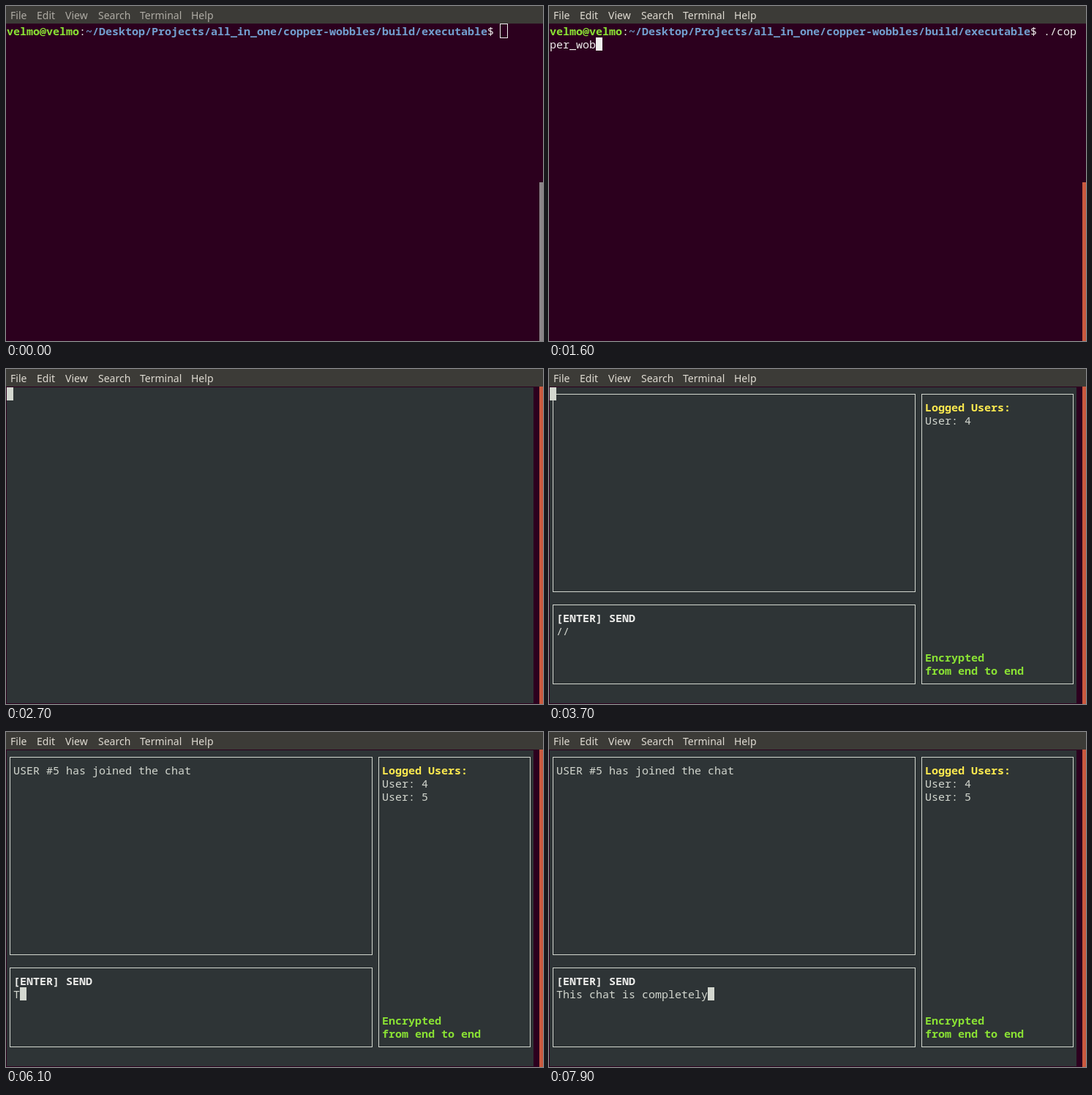
An HTML page with a canvas for the animation above (8000 ms loop, 734 by 458 pixels).

```html
<!DOCTYPE html>
<html lang="en">
<head>
<meta charset="utf-8">
<title>Terminal chat</title>
<style>
  html, body { margin: 0; width: 100%; height: 100%; overflow: hidden; background: #2c001e; }
  canvas { display: block; }
</style>
</head>
<body>
<canvas id="stage" width="734" height="458"></canvas>
<script>
const ctx = document.getElementById('stage').getContext('2d');
const LOOP = 8000, COLS = 80, CELL_W = 9, CELL_H = 18;
const PURPLE = '#2c001e', SLATE = '#2e3436', LIGHT = '#d3d7cf', WHITE = '#eeeeec';
const GREEN = '#8ae234', BLUE = '#729fcf', YELLOW = '#fce94f';

const MENU = [['File', 6], ['Edit', 42], ['View', 81], ['Search', 126], ['Terminal', 183], ['Help', 253]];
const USER = 'velmo@velmo';
const PATH = '~/Desktop/Projects/all_in_one/copper-wobbles/build/executable';
const COMMAND = './copper_wobbles 127.0.0.1 54000';
const MESSAGE = 'This chat is completely';

const cellX = col => 1 + col * CELL_W;
const cellY = row => 25 + row * CELL_H;
const clamp = (v, lo, hi) => Math.min(hi, Math.max(lo, v));

function rect(x, y, w, h, color) {
  ctx.fillStyle = color;
  ctx.fillRect(x, y, w, h);
}

function print(text, col, row, color = LIGHT, bold = false) {
  ctx.font = `${bold ? 700 : 400} 15px "Noto Sans Mono", "Liberation Mono", monospace`;
  ctx.fillStyle = color;
  ctx.fillText(text, cellX(col), cellY(row) + 15);
}

function cursor(col, row, focused, color = LIGHT) {
  const x = cellX(col), y = cellY(row);
  if (focused) return rect(x, y, CELL_W, CELL_H, color);
  ctx.strokeStyle = color;
  ctx.strokeRect(x - 0.5, y - 0.5, CELL_W + 1, CELL_H + 1);
}

// Box lines run through the centres of the border cells.
function box(c0, r0, c1, r1) {
  ctx.strokeStyle = LIGHT;
  ctx.strokeRect(cellX(c0) + 4.5, cellY(r0) + 9.5, (c1 - c0) * CELL_W, (r1 - r0) * CELL_H);
}

function chrome(focused, barTop) {
  rect(0, 0, 734, 458, PURPLE);
  rect(0, 0, 734, 24, '#3c3b37');
  ctx.font = '14px "Noto Sans", "Open Sans", sans-serif';
  ctx.fillStyle = focused ? '#dfdbd2' : '#aeaba4';
  for (const [label, x] of MENU) ctx.fillText(label, x, 18);
  rect(729, barTop, 5, 458 - barTop, focused ? '#cb593f' : '#8c8589');
}

function pointer(x, y) {
  rect(x - 2, y - 7, 5, 1, WHITE);
  rect(x, y - 7, 1, 14, WHITE);
  rect(x - 2, y + 6, 5, 1, WHITE);
}

function shell(t, focused) {
  print(USER, 0, 0, GREEN, true);
  print(':', 11, 0, WHITE);
  print(PATH, 12, 0, BLUE, true);
  print('$', 73, 0, WHITE);

  const typed = Math.floor(clamp((t - 1000) / 1500, 0, 1) * COMMAND.length);
  const start = 75, room = COLS - start;
  print(COMMAND.slice(0, Math.min(typed, room)), start, 0, WHITE);
  if (typed > room) print(COMMAND.slice(room, typed), 0, 1, WHITE);

  const end = start + typed;
  if (t >= 2600) cursor(0, 2, focused, WHITE);
  else cursor(end % COLS, Math.floor(end / COLS), focused, WHITE);

  if (t >= 100 && t < 1000) {
    const left = 1 - clamp((t - 100) / 600, 0, 1);
    pointer(352, Math.round(381 + 88 * left * left));
  }
}

function chat(t, focused) {
  rect(1, 25, COLS * CELL_W, 432, SLATE);
  if (t < 3000) return cursor(0, 0, focused);

  box(0, 0, 55, 15);
  box(0, 16, 55, 22);
  box(56, 0, 79, 22);
  if (t >= 4500) print('USER #5 has joined the chat', 1, 1);
  print('Logged Users:', 57, 1, YELLOW, true);
  print('User: 4', 57, 2);
  if (t >= 4800) print('User: 5', 57, 3);
  print('Encrypted', 57, 20, GREEN, true);
  print('from end to end', 57, 21, GREEN, true);
  print('[ENTER] SEND', 1, 17, WHITE, true);

  if (t < 6050) {
    print('//', 1, 18);
    cursor(0, 0, focused);
  } else {
    const typed = clamp(1 + Math.floor((t - 6100) * 22 / 1790), 1, MESSAGE.length);
    print(MESSAGE.slice(0, typed), 1, 18);
    cursor(1 + typed, 18, focused);
  }
}

function draw(now) {
  const t = now % LOOP;
  const focused = t >= 950 && t < 3900 || t >= 5300;
  const running = t >= 2700;
  chrome(focused, running ? 24 : 241);
  (running ? chat : shell)(t, focused);
  requestAnimationFrame(draw);
}

ctx.lineWidth = 1;
requestAnimationFrame(draw);
</script>
</body>
</html>
```
